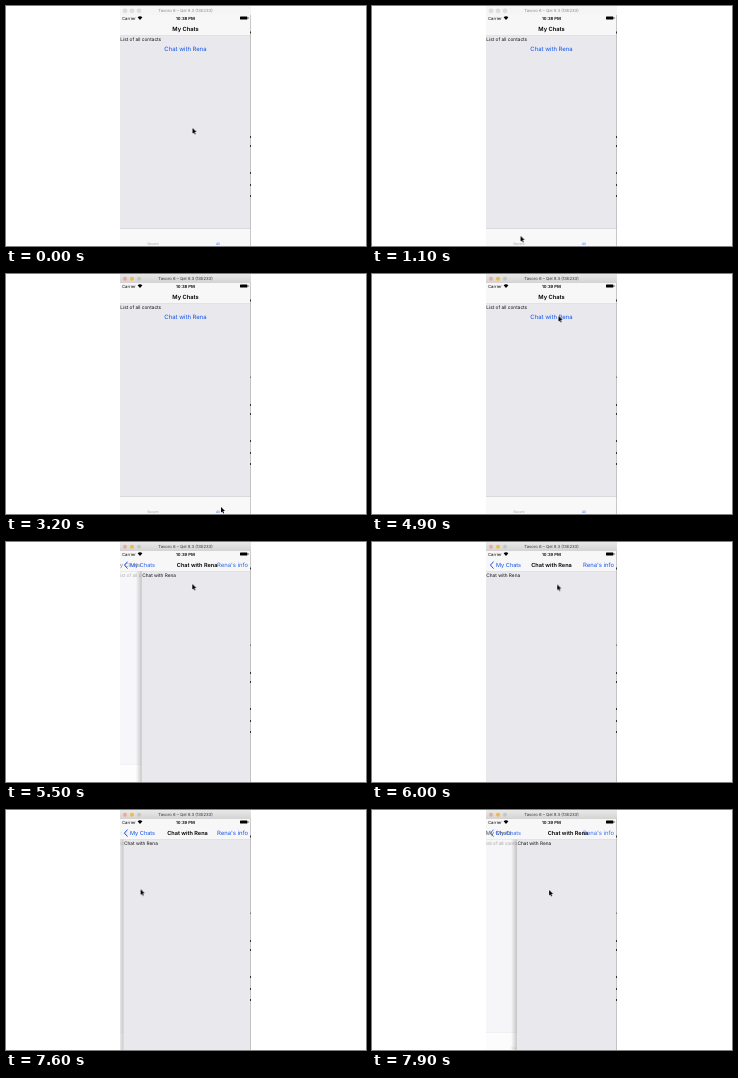
An HTML page for the animation above (8000 ms loop, 360 px wide and 240 px high).

```html
<!DOCTYPE html>
<html lang="en">
<head>
<meta charset="utf-8">
<title>Chat navigation</title>
<style>
  /* --q: how far the chat page is off to the right, 1 = hidden, 0 = open */
  @property --q { syntax: "<number>"; inherits: true; initial-value: 1; }

  html, body { margin: 0; width: 100%; height: 100%; overflow: hidden; background: #fff; }
  svg {
    display: block; width: 360px; height: 240px;
    font-family: Inter, "Liberation Sans", sans-serif;
    text-rendering: geometricPrecision;
    animation: push 8s infinite linear;
  }
  .mid { text-anchor: middle; }
  .end { text-anchor: end; }
  .blue { fill: #1453ee; }
  .body { font-size: 4.75px; fill: #111; }
  .link { font-size: 5.95px; }
  .title { font-size: 5.75px; font-weight: 600; }
  .back { font-size: 5.6px; }
  .bar { font-size: 4.2px; }
  .clock { font-weight: 600; }
  .tab { font-size: 3.4px; fill: #a0a0a4; }
  .tab.on { fill: #2f6ff0; }

  .idle, .live, .recent, .all, .early, .late { animation: 8s infinite step-end; }
  .idle { animation-name: idle; }
  .live { animation-name: live; }
  .recent { animation-name: recent; }
  .all { animation-name: all; }
  .early { animation-name: early; }
  .late { animation-name: late; }
  .tap { animation: tap 8s infinite linear; }
  .cursor { animation: roam 8s infinite ease-in-out; }

  .sheet { transform: translateX(calc(var(--q) * 131px)); }
  .under { opacity: calc(.2 + .8 * var(--q)); transform: translateX(calc((var(--q) - 1) * 3.6px)); }
  .shade { opacity: calc((1 - var(--q)) * 8); }
  .old { opacity: calc(var(--q) * 2); transform: translateX(calc((var(--q) - 1) * 69.4px)); }
  .new { opacity: calc((1 - var(--q)) * 1.3); transform: translateX(calc(var(--q) * 69.4px)); }
  .fade { opacity: calc((1 - var(--q)) * 1.1); }

  @keyframes push {
    0% { --q: 1; }
    65% { --q: 1; animation-timing-function: cubic-bezier(.3, .4, .6, .9); }
    68.75% { --q: .168; animation-timing-function: ease-out; }
    73% { --q: 0; }
    93.5% { --q: 0; animation-timing-function: ease-in; }
    98.75% { --q: .237; }
    100% { --q: .31; }
  }
  @keyframes idle { 0% { opacity: 1; } 15%, 100% { opacity: 0; } }
  @keyframes live { 0% { opacity: 0; } 15%, 100% { opacity: 1; } }
  @keyframes recent { 0% { opacity: 0; } 17.5% { opacity: 1; } 33.75%, 100% { opacity: 0; } }
  @keyframes all { 0% { opacity: 1; } 17.5% { opacity: 0; } 33.75%, 100% { opacity: 1; } }
  @keyframes early { 0% { opacity: 1; } 50%, 100% { opacity: 0; } }
  @keyframes late { 0% { opacity: 0; } 50%, 100% { opacity: 1; } }
  @keyframes tap { 0%, 62.5% { opacity: 1; } 63.75% { opacity: .3; } 66%, 100% { opacity: 1; } }
  @keyframes roam {
    0%, 3.5% { transform: translate(186.5px, 122px); }
    14% { transform: translate(148.5px, 230px); }
    25% { transform: translate(148.5px, 230px); }
    32.5% { transform: translate(215px, 233px); }
    46% { transform: translate(215px, 233px); }
    56.25% { transform: translate(186.5px, 42px); }
    74% { transform: translate(186.2px, 42px); }
    86% { transform: translate(116.5px, 79px); }
    91.5% { transform: translate(116.5px, 79px); animation-timing-function: ease-in; }
    98.75% { transform: translate(177px, 80px); animation-timing-function: linear; }
    100% { transform: translate(188px, 80px); }
  }
</style>
</head>
<body>
<svg viewBox="0 0 360 240">
  <defs>
    <clipPath id="screen"><path d="M114 0H245V240H114Z"/></clipPath>
    <linearGradient id="chrome" x2="0" y2="1">
      <stop stop-color="#e9e9e9"/><stop offset="1" stop-color="#d3d3d3"/>
    </linearGradient>
    <linearGradient id="edge">
      <stop stop-color="#777" stop-opacity="0"/><stop offset="1" stop-color="#777" stop-opacity=".4"/>
    </linearGradient>
  </defs>

  <g clip-path="url(#screen)">
    <!-- list page -->
    <g class="under">
      <path fill="#e8e8ed" d="M114 28H250V240H114Z"/>
      <path fill="#f8f8f9" d="M114 222.5H250V240H114Z"/>
      <path fill="#c4c4c8" d="M114 222.3H250V222.8H114Z"/>
      <g class="all">
        <text class="body" x="114.3" y="35.3">List of all contacts</text>
        <text class="link blue mid tap" x="179.5" y="45.3">Chat with Rena</text>
        <text class="tab mid" x="147" y="238.6">Recent</text>
        <text class="tab on mid" x="212" y="238.6">All</text>
      </g>
      <g class="recent">
        <text class="body" x="114.3" y="35.3">List of recent chats</text>
        <text class="link blue mid" x="179.5" y="45.3">Chat with Tess</text>
        <text class="tab on mid" x="147" y="238.6">Recent</text>
        <text class="tab mid" x="212" y="238.6">All</text>
      </g>
    </g>

    <!-- chat page -->
    <g class="sheet">
      <path class="shade" fill="url(#edge)" d="M108 28H114V240H108Z"/>
      <path fill="#e8e8ed" d="M114 28H245V240H114Z"/>
      <text class="body" x="114.3" y="35.3">Chat with Rena</text>
    </g>

    <!-- navigation bar -->
    <path fill="#f7f7f8" d="M114 9H245V29.3H114Z"/>
    <path fill="#c4c4c8" d="M114 29.2H245V29.6H114Z"/>
    <text class="title mid old" x="179.5" y="25.2">My Chats</text>
    <text class="title mid new" x="179.5" y="25.2" style="font-size:5.6px">Chat with Rena</text>
    <g class="fade">
      <path d="M121.6 19.6 118.4 23.1 121.6 26.6" fill="none" stroke="#1453ee"/>
      <text class="back blue" x="124" y="25.2">My Chats</text>
      <text class="link blue end" x="242.2" y="25.2">Rena's info</text>
    </g>

    <!-- status bar -->
    <text class="bar" x="116" y="13.6">Carrier</text>
    <path d="M134 14 131.6 11.3Q134 9.2 136.4 11.3Z"/>
    <text class="bar clock mid early" x="179.5" y="13.6">10:38 PM</text>
    <text class="bar clock mid late" x="179.5" y="13.6">10:39 PM</text>
    <rect x="234" y="10.4" width="7.4" height="3.2" rx=".7"/>
    <path d="M241.8 11.2H242.4V12.8H241.8Z"/>

    <!-- window title bar -->
    <g class="idle">
      <path fill="#f5f5f5" d="M114 0H245V9H114Z"/>
      <g fill="#dedede" stroke="#c9c9c9" stroke-width=".4">
        <circle cx="119" cy="4.8" r="2"/><circle cx="126" cy="4.8" r="2"/><circle cx="133" cy="4.8" r="2"/>
      </g>
      <text class="bar mid" x="179.5" y="6.3" fill="#888">Tavoro 6 – Qel 9.3 (13E233)</text>
    </g>
    <g class="live">
      <path fill="url(#chrome)" d="M114 0H245V9H114Z"/>
      <circle cx="119" cy="4.8" r="2" fill="#e9aaa2"/>
      <circle cx="126" cy="4.8" r="2" fill="#f2b84a"/>
      <circle cx="133" cy="4.8" r="2" fill="#c6c6c6"/>
      <text class="bar mid" x="179.5" y="6.3" fill="#333">Tavoro 6 – Qel 9.3 (13E233)</text>
      <path fill="#333" d="M244 102.5h1v1.5h-1z"/>
    </g>
    <path fill="#aaa" d="M244.4 9H245V240H244.4Z"/>
    <path fill="#333" d="M244 25.5h1v2h-1zM244 130h1v2h-1zM244 139h1v2h-1zM244 166h1v2h-1zM244 178h1v2h-1zM244 189h1v2h-1z"/>
  </g>

  <path class="cursor" d="M0 0V5.6L1.3 4.4 2.2 6.4 3.1 6 2.2 4.1H4Z" stroke="#fff" stroke-width=".7" paint-order="stroke"/>
</svg>
</body>
</html>
```
